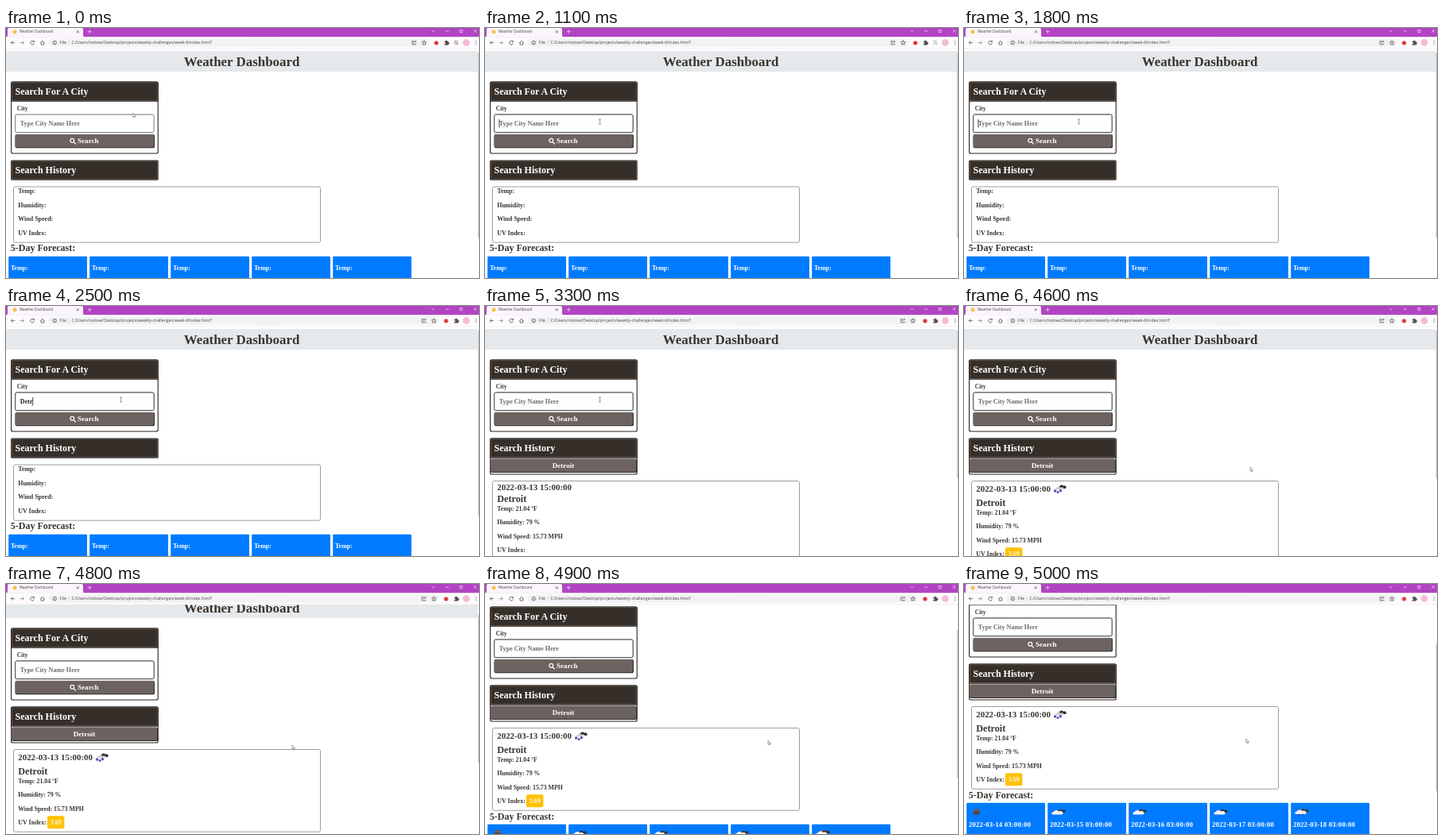
These frames come from a looping animation (595x315 px, 5.1 s). An HTML page:

```html
<!DOCTYPE html>
<html lang="en">
<head>
<meta charset="utf-8">
<title>Weather Dashboard</title>
<style>
html, body { margin: 0; width: 100%; height: 100%; overflow: hidden; background: #fff; }
svg { display: block; }
text { font: bold 8px "Liberation Serif", serif; fill: #3a342f; white-space: pre; }
.ui { font: 5.2px "Open Sans", sans-serif; fill: #444; }
.h1 { font-size: 16.9px; }
.h3 { font-size: 12px; }
.date { font-size: 10.95px; }
.btn { font-size: 9.1px; }
.info { font-size: 7.8px; }
.mid { text-anchor: middle; }
.white { fill: #fff; }
.day text { fill: #fff; }
.day .when { font-size: 8.9px; letter-spacing: .1px; }
.line { fill: none; stroke: #555; stroke-width: .8; }
.card { fill: none; stroke: #858585; stroke-width: .8; }
.edge { fill: #fff; stroke: #29231f; stroke-width: 1.1; }

/* every part shares one 5.1 s loop made of hard steps */
.old, .new, .late, .rows, .dateline, .focus, .page, .thumb, .cursor, .arrow, .beam, .tools, .extra {
  animation: 5.1s step-end infinite;
}
.old { animation-name: old; }
.new { animation-name: new; }
.late { animation-name: late; }
.rows { animation-name: rows; }
.dateline { animation-name: dateline; }
.focus { animation-name: focus; }
.page { animation-name: scroll; }
.thumb { animation-name: new, thumb; }
.cursor { animation-name: move; }
.arrow { animation-name: arrow; }
.beam { animation-name: beam; }
.tools { animation-name: tools; }
.extra { animation-name: extra; }

@keyframes old { 0% { visibility: visible } 64.7%, 100% { visibility: hidden } }
@keyframes new { 0% { visibility: hidden } 64.7%, 100% { visibility: visible } }
@keyframes late { 0% { visibility: hidden } 72.54%, 100% { visibility: visible } }
@keyframes rows { 0% { transform: none } 72.54%, 100% { transform: translateY(5px) } }
@keyframes dateline { 0% { transform: none } 72.54%, 100% { transform: translateY(1.5px) } }
@keyframes focus { 0% { opacity: 0 } 19.6%, 100% { opacity: 1 } }
@keyframes scroll {
  0% { transform: none }
  94.11% { transform: translateY(-12px) }
  96.07% { transform: translateY(-39px) }
  98.03%, 100% { transform: translateY(-66px) }
}
@keyframes thumb {
  0% { transform: none }
  94.11% { transform: translateY(8px) }
  96.07% { transform: translateY(27px) }
  98.03%, 100% { transform: translateY(44px) }
}
@keyframes move {
  0% { transform: translate(159.5px, 107px) }
  11.76% { transform: translate(156px, 110px) }
  13.72% { transform: translate(150px, 114px) }
  15.68% { transform: translate(146px, 117px) }
  17.64% { transform: translate(144.5px, 118px) }
  80.39% { transform: translate(190px, 140px) }
  82.35% { transform: translate(262px, 172px) }
  84.31% { transform: translate(322px, 194px) }
  86.27% { transform: translate(352px, 202px) }
  88.23% { transform: translate(360px, 203px) }
  96.07% { transform: translate(356px, 197px) }
  98.03%, 100% { transform: translate(354.7px, 195px) }
}
@keyframes arrow { 0% { opacity: 1 } 11.76% { opacity: 0 } 80.39%, 100% { opacity: 1 } }
@keyframes beam { 0% { opacity: 0 } 11.76% { opacity: 1 } 80.39%, 100% { opacity: 0 } }
@keyframes tools {
  0% { transform: none }
  23.52% { transform: translateX(4px) }
  25.49% { transform: translateX(8px) }
  27.45%, 100% { transform: translateX(12.3px) }
}
@keyframes extra { 0% { opacity: .8 } 19.6% { opacity: .5 } 23.52%, 100% { opacity: 0 } }
</style>
</head>
<body>
<svg width="595" height="315" viewBox="0 0 595 315">
<defs>
  <clipPath id="view"><path d="M0 26H595V315H0z"/></clipPath>
  <g id="bar">
    <rect x="6.1" y="0" width="185.6" height="25.2" rx="1.5" fill="#29231f"/>
    <rect x="7.4" y="1.3" width="183" height="22.6" fill="#362f29" stroke="#837d77" stroke-width=".5"/>
  </g>
  <g id="button">
    <rect width="175.4" height="17.2" rx="2" fill="#29231f"/>
    <rect width="174.2" height="16" rx="2" fill="#6c6361" stroke="#857d7a" stroke-width=".5"/>
  </g>
  <path id="cloud" d="M1 8a2.2 2.2 0 0 1 0-4.4A3.6 3.6 0 0 1 7.8 2.6 2.7 2.7 0 0 1 11.5 8z"/>
  <g id="cloudy">
    <use href="#cloud" transform="translate(6.2 1.2) scale(.78 .5)" fill="#3a3533"/>
    <use href="#cloud" transform="translate(0 2.2) scale(1 .74)" fill="#f4f4f4"/>
  </g>
  <rect id="blue" x=".2" width="98.8" height="70" rx="1" fill="#007bff"/>
</defs>

<g clip-path="url(#view)">
<g class="page">
  <rect y="29" width="593.5" height="26" fill="#e5e9eb"/>
  <text class="h1 mid" x="296.5" y="47.6">Weather Dashboard</text>

  <rect class="edge" x="6.6" y="68" width="184.6" height="90" rx="2"/>
  <use href="#bar" y="67.5"/>
  <text class="h3 white" x="11.5" y="83.9">Search For A City</text>
  <text x="13.8" y="103.6" style="font-size:7.4px">City</text>
  <rect x="11.7" y="109" width="174.4" height="22.6" rx="1.8" fill="#fff" stroke="#777"/>
  <rect class="focus" x="11.7" y="109" width="174.4" height="22.6" rx="1.8" fill="#fdfefe" stroke="#45484a"/>
  <text id="hint" x="17.8" y="123" style="font-size:8.1px;fill:#716b67">Type City Name Here</text>
  <text id="typed" x="17.8" y="123" style="font-size:8.1px;fill:#222"></text>
  <rect id="caret" y="115" width=".8" height="10.5" fill="#111"/>
  <use href="#button" x="11.6" y="134"/>
  <g fill="none" stroke="#fff" stroke-width="1.2"><circle cx="83.3" cy="141.8" r="2.4"/><path d="M85.1 143.6L87.5 146" stroke-linecap="round"/></g>
  <text class="btn white" x="90" y="145.4">Search</text>

  <g class="new">
    <rect class="edge" x="6.6" y="167" width="184.6" height="45" rx="2"/>
    <use href="#button" transform="translate(7 192.7) scale(1.05 1)"/>
    <text class="btn white mid" x="98.5" y="204">Detroit</text>
  </g>
  <use href="#bar" y="166.5"/>
  <text class="h3 white" x="11.5" y="182.9">Search History</text>

  <g class="old">
    <rect class="card" x="9.5" y="200" width="386" height="70.2" rx="2.2"/>
    <text x="15.2" y="208.3">Temp:</text>
    <text x="15.2" y="225.8">Humidity:</text>
    <text x="15.2" y="243.3">Wind Speed:</text>
    <text x="15.2" y="260.8">UV Index:</text>
    <text class="h3" x="5.8" y="281.4">5-Day Forecast:</text>
    <g class="day">
      <use href="#blue" x="3" y="287.7"/><text x="6" y="305">Temp:</text>
      <use href="#blue" x="105" y="287.7"/><text x="108" y="305">Temp:</text>
      <use href="#blue" x="207" y="287.7"/><text x="210" y="305">Temp:</text>
      <use href="#blue" x="309" y="287.7"/><text x="312" y="305">Temp:</text>
      <use href="#blue" x="411" y="287.7"/><text x="414" y="305">Temp:</text>
    </g>
  </g>

  <g class="new">
    <rect class="card" x="9.5" y="220.5" width="386" height="103.8" rx="2.2"/>
    <text class="date dateline" x="15.2" y="232.1">2022-03-13 15:00:00</text>
    <g class="rows">
      <text x="15.2" y="246.7" style="font-size:12.2px">Detroit</text>
      <text class="info" x="15.2" y="257.6">Temp: 21.04 °F</text>
      <text class="info" x="15.2" y="275">Humidity: 79 %</text>
      <text class="info" x="15.2" y="292.5">Wind Speed: 15.73 MPH</text>
      <text x="15.2" y="310">UV Index:</text>
    </g>
    <text class="h3" x="5.8" y="335.6">5-Day Forecast:</text>
    <g class="day">
      <use href="#blue" x="3" y="341.7"/><text class="when" x="6" y="372.3">2022-03-14 03:00:00</text>
      <use href="#blue" x="105" y="341.7"/><text class="when" x="108" y="372.3">2022-03-15 03:00:00</text>
      <use href="#blue" x="207" y="341.7"/><text class="when" x="210" y="372.3">2022-03-16 03:00:00</text>
      <use href="#blue" x="309" y="341.7"/><text class="when" x="312" y="372.3">2022-03-17 03:00:00</text>
      <use href="#blue" x="411" y="341.7"/><text class="when" x="414" y="372.3">2022-03-18 03:00:00</text>
      <circle cx="15.7" cy="353.3" r="4" fill="#4f4a4a"/>
      <path d="M11.9 352a4 4 0 0 1 7.6 0z" fill="#7d5a45"/>
      <use href="#cloudy" x="111.5" y="348.5"/>
      <use href="#cloudy" x="213.5" y="348.5"/>
      <use href="#cloudy" x="315.5" y="348.5"/>
      <circle cx="423" cy="351.6" r="2.4" fill="#a2604a"/>
      <use href="#cloudy" x="417.5" y="348"/>
      <path d="M422 355.5l-1.2 2.6M426.5 355.5l-1.2 2.6" stroke="#4a3f8c" stroke-width="1.2"/>
    </g>
  </g>

  <g class="late">
    <use href="#cloud" transform="translate(119.6 225.2) scale(.7 .6)" fill="#2d2a2d"/>
    <use href="#cloud" transform="translate(115.5 227.4) scale(.78 .5)" fill="#cfcfd6"/>
    <g fill="#5550b4"><circle cx="114.6" cy="233" r="1.7"/><circle cx="118" cy="234.5" r="1.5"/><circle cx="121.4" cy="232.8" r="1.7"/></g>
    <rect x="52" y="304.2" width="21.4" height="16" rx="2" fill="#ffc107"/>
    <text class="white mid" x="62.7" y="315" opacity=".85">3.69</text>
  </g>
</g>
</g>

<g fill="#c6c6c6">
  <rect class="old" x="593.7" y="31" width="1.3" height="233"/>
  <rect class="thumb" x="593.7" y="31" width="1.3" height="186"/>
</g>

<!-- browser frame -->
<rect width="595" height="11.5" fill="#b244c3"/>
<path d="M0 11.5Q2 11.5 2 9V1.5Q2 0 4 0H95Q97 0 97 1.5V9Q97 11.5 99 11.5z" fill="#fbf5fc"/>
<rect y="11.3" width="595" height="14.7" fill="#fdfbfd"/>
<path d="M0 26H595" stroke="#e6e2e6" stroke-width=".5"/>
<g fill="#f2f2f4">
  <rect x="53" y="13.4" width="300" height="10" rx="5"/>
  <rect class="tools" x="300" y="13.4" width="232" height="10" rx="5"/>
</g>
<circle cx="11" cy="4.7" r="2.5" fill="#f7c04a"/>
<text class="ui" x="17" y="6.3" style="font-size:4.5px">Weather Dashboard</text>
<path class="line" d="M88.8 3.2l3 3m0-3l-3 3"/>
<g fill="none" stroke="#f3e2f6" stroke-width=".7">
  <path d="M102.7 4.6h5M105.2 2.1v5"/>
  <path d="M535.4 3l1.7 1.6 1.7-1.6M553 4h4M588.4 2l3.6 3.6m0-3.6l-3.6 3.6"/>
  <rect x="571" y="2.4" width="3" height="3"/>
</g>
<g class="line">
  <path d="M11 18.5H6.2m2.2-2.2l-2.2 2.2 2.2 2.2"/>
  <path d="M17.6 18.5h4.8m-2.2-2.2l2.2 2.2-2.2 2.2" stroke="#888"/>
  <path d="M35 17a2.4 2.4 0 1 0 .4 2.3M35.4 15.8v1.9h-1.9"/>
  <path d="M43.3 18.6l2.6-2.5 2.6 2.5M44.1 18v3h3.6v-3"/>
  <circle cx="61.3" cy="18.5" r="2.3"/><path d="M61.3 18.2v1.6M61.3 17v.5"/>
  <path d="M79.2 16v5" stroke="#bbb" stroke-width=".5"/>
</g>
<text class="ui" x="67.8" y="20.4" style="font-size:5px">File</text>
<text class="ui" x="82.5" y="20.4">C:/Users/mdove/Desktop/projects/weekly-challenges/week-6/index.html?</text>
<g class="tools">
  <path class="line" d="M513 16.4h-2v4.4h4.4v-1.2M512.6 19q.2-2 3-2.1m-1-1.2l1.2 1.2-1.2 1.2" stroke-width=".6"/>
  <path class="line" d="M526 15.7l.8 1.9 2 .2-1.5 1.3.4 2-1.7-1-1.7 1 .4-2-1.5-1.3 2-.2z" stroke-width=".6"/>
  <circle cx="541.3" cy="18.8" r="2.6" fill="#d93a3a"/>
  <path d="M551.5 16.8h1.6a1 1 0 1 1 1.9 0h1.5v1.5a1 1 0 1 1 0 1.9v1.4h-5v-1.5a1 1 0 1 0 0-1.9z" fill="#4b4b4b"/>
</g>
<path class="line extra" d="M563.8 16.5h4.6M563.8 18.3h2.4M563.8 20.1h1.8M567 18.2v2.6l2-1.3z" stroke-width=".6"/>
<circle cx="579" cy="18.5" r="4.4" fill="#f4bcd6"/>
<g fill="#555"><circle cx="591.2" cy="16.5" r=".6"/><circle cx="591.2" cy="18.5" r=".6"/><circle cx="591.2" cy="20.5" r=".6"/></g>

<g class="cursor">
  <path class="arrow" d="M0 0V5.2L1.2 4.1 2.1 6 2.8 5.6 2 3.8H3.7z" fill="#fff" stroke="#666" stroke-width=".6"/>
  <path class="beam" d="M-1.2-3H1.2M0-3V3M-1.2 3H1.2" fill="none" stroke="#555" stroke-width=".7"/>
</g>
</svg>
<script>
const [hint, typed, caret] = ["hint", "typed", "caret"].map(id => document.getElementById(id));
const word = "Detroit";
const keys = [2000, 2200, 2300, 2500, 2700, 2800, 3000];
const focusAt = 1000, sentAt = 3300;

function draw() {
  const t = performance.now() % 5100;
  const editing = t >= focusAt && t < sentAt;
  const count = editing ? keys.filter(k => k <= t).length : 0;
  typed.textContent = word.slice(0, count);
  hint.style.opacity = count ? 0 : 1;
  caret.style.opacity = editing ? 1 : 0;
  caret.setAttribute("x", 17.6 + typed.getComputedTextLength());
  requestAnimationFrame(draw);
}
draw();
</script>
</body>
</html>
```
